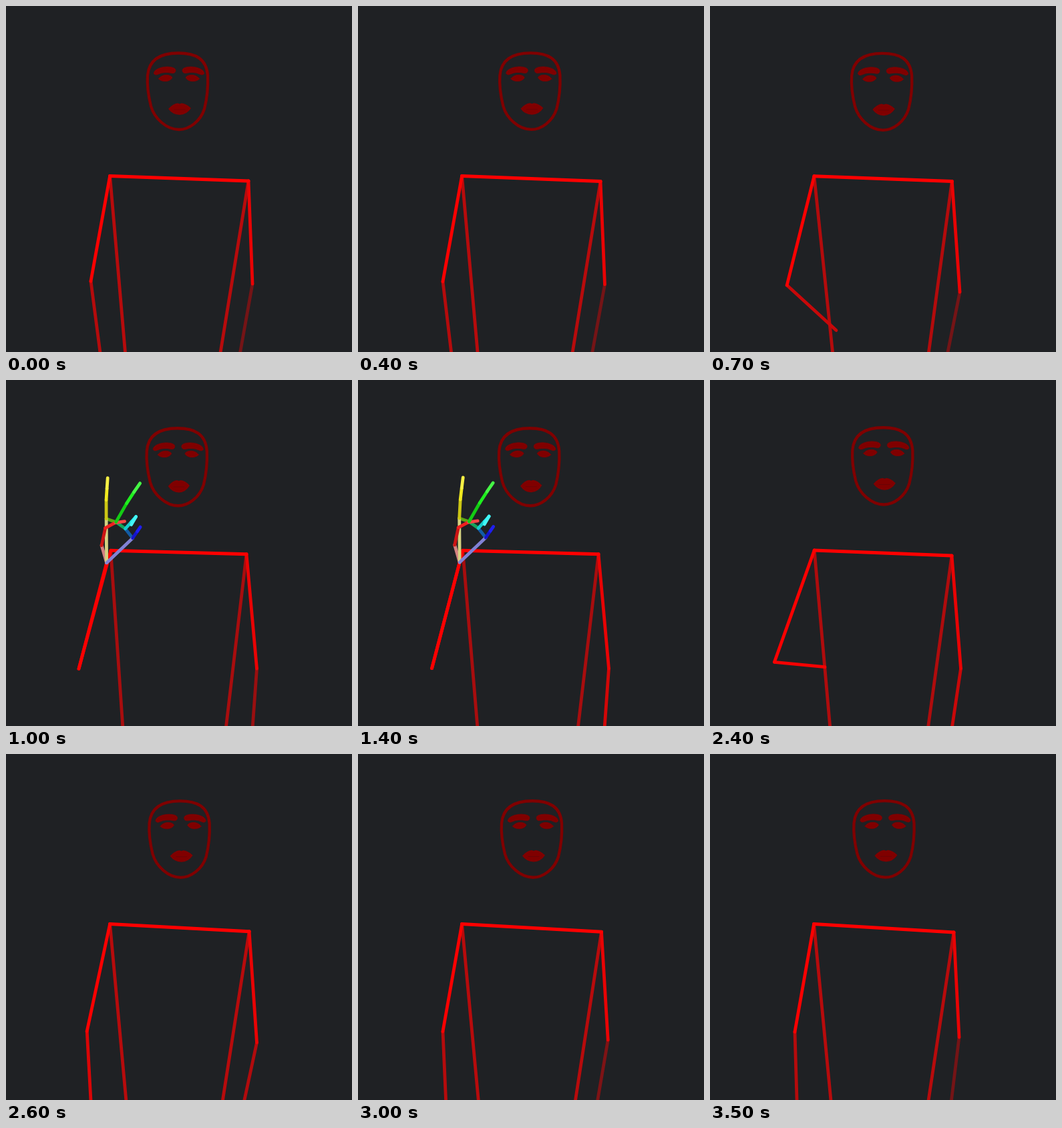
These frames come from a looping animation (518x518 px, 3600 ms). An HTML page with a canvas:

```html
<!DOCTYPE html>
<html lang="en">
<head>
<meta charset="utf-8">
<title>Pose tracking</title>
<style>
html, body { margin: 0; width: 100%; height: 100%; overflow: hidden; background: #1f2124; }
canvas { display: block; width: 518px; height: 518px; }
</style>
</head>
<body>
<canvas id="stage" width="518" height="518"></canvas>
<script>
const ctx = document.getElementById('stage').getContext('2d');
const LOOP = 3600, STEP = 100;
const BG = [31, 33, 36];

const mix = (a, b, k) => a + (b - a) * k;
const bump = (t, centre, width) => Math.exp(-(((t - centre) / width) ** 2));

function ramp(t, from, to) {
  const k = Math.min(1, Math.max(0, (t - from) / (to - from)));
  return k * k * (3 - 2 * k);
}

const pulse = (t, up, top, leave, down) => ramp(t, up, top) - ramp(t, leave, down);

function red(level) {
  return `rgb(${BG.map((v, i) => Math.round(mix(v, i ? 0 : 255, level)))})`;
}

function line(a, b, color, width = 4.8) {
  ctx.strokeStyle = color;
  ctx.lineWidth = width;
  ctx.beginPath();
  ctx.moveTo(a[0], a[1]);
  ctx.lineTo(b[0], b[1]);
  ctx.stroke();
}

// The body drifts slowly while the left forearm swings up about its elbow and back.
function poseAt(t) {
  const drift = t / (LOOP - STEP);
  const late = drift * drift;
  const lift = pulse(t, 550, 1000, 2200, 2600);
  const follow = pulse(t, 550, 1000, 2200, 3000);
  const stance = pulse(t, 500, 800, 2200, 2600);
  const hang = pulse(t, 500, 800, 2600, 3500);
  const swing = Math.sin(Math.PI * lift);

  const elbowL = [
    mix(127, 105 + 14 * drift, follow) - (5 + 22 * drift) * swing,
    mix(412 + 4 * drift, 434 - 6 * drift, lift)
  ];
  const angle = mix(.13 - .1 * drift, 2.885, lift);
  const reach = 164 - 88 * swing;

  return {
    drift, lift, elbowL,
    wristL: [elbowL[0] + reach * Math.sin(angle), elbowL[1] + reach * Math.cos(angle)],
    shoulderL: [mix(155.6, 156.8, lift), mix(254.5, 255.3, lift)],
    shoulderR: [mix(363 + 2 * late, 360, lift), mix(262 + 5 * drift, 260.7, lift)],
    elbowR: [mix(369 + 4 * drift, 375.5, hang), mix(416 + 8 * drift, 432, hang)],
    wristR: [mix(350 + 11 * late, 369, lift), 522],
    hipL: [178.5 + 2.5 * late + 5.5 * bump(t, 700, 200) - 4.5 * bump(t, 1000, 200), 519],
    hipR: [mix(321 + 6 * late, 329.5, stance), 519],
    glowL: mix(.67, 1, follow),
    glowR: mix(.38, .8, pulse(t, 700, 1400, 2200, 3200))
  };
}

const outline = new Path2D('M258 70.5C284 70.5 300 79 302 104C303 126 300 142 297 154C291 173 274 185 259 185C240 185 222 168 217 150C212 130 211 118 212 104C214 80 232 70.5 258 70.5Z');
const brow = new Path2D('M-37.5 101C-38 95 -27 91 -17 91Q-5 91.5 -5 96.5Q-5.5 101 -10 100.5Q-23 98 -31 102Q-36 104.5 -37.5 101Z');
const eye = new Path2D('M-30.5 109C-26 102 -14 101.5 -10 107C-13 114 -26 114.5 -30.5 109Z');
const lips = new Path2D('M-17 0Q-10 -8 -3 -8.5L0 -7.5L3 -8.5Q10 -8 17 -1Q11 8.5 0 9Q-11 8.5 -17 0Z');

function drawFace({ drift, lift }) {
  const dx = 3.5 * drift - 2.2 * lift;
  const dy = 3.2 * lift - drift;
  const dark = '#640608';
  ctx.strokeStyle = ctx.fillStyle = '#800000';

  ctx.save();
  ctx.translate(dx, dy * .3);
  ctx.scale(1, 1 + .013 * lift);
  ctx.lineWidth = 4.3;
  ctx.stroke(outline);
  ctx.restore();

  ctx.lineWidth = .8;
  for (const side of [1, -1]) {
    ctx.save();
    ctx.translate(259 + dx, dy);
    ctx.scale(side, 1);
    for (const part of [brow, eye]) {
      ctx.fill(part);
      ctx.stroke(part);
    }
    ctx.restore();
  }

  ctx.save();
  ctx.translate(260 + dx, 154 + dy * 1.7);
  ctx.scale(1 - lift * .05, 1 + lift * .06);
  ctx.fill(lips);
  ctx.restore();
  line([252 + dx, 155 + dy * 1.7], [268 + dx, 155 + dy * 1.7], dark, .8);
}

function drawBody(p) {
  const torso = red(.68 - .07 * p.lift);
  line(p.shoulderL, p.hipL, torso);
  line(p.shoulderR, p.hipR, torso);
  line(p.elbowR, p.wristR, red(p.glowR));
  line(p.elbowL, p.wristL, red(p.glowL));
  line(p.shoulderL, p.elbowL, red(.98));
  line(p.shoulderR, p.elbowR, red(.9));
  line(p.shoulderL, p.shoulderR, red(1), 5);
}

// Finger joints from knuckle to tip, relative to the wrist.
const fingers = [
  { hue: 0, palm: true, joints: [[-7.5, -26], [-2, -52], [13, -60], [27, -62]] },
  { hue: 58, palm: true, joints: [[-.5, -66], [1, -94], [3, -111], [5, -127]], sway: true },
  { hue: 120, joints: [[14, -61], [30, -89], [41, -106], [50, -119]] },
  { hue: 180, joints: [[28, -51], [37, -61], [44, -69], [37, -57]] },
  { hue: 240, palm: true, joints: [[39, -37], [46, -47], [50.5, -53.5]] }
];

function drawHand({ drift, lift, wristL: [x, y] }) {
  if (lift < .8) return;
  const lean = 30 * drift - 12;
  const hand = fingers.map(f => f.joints.map(([jx, jy]) =>
    [x + jx + (f.sway ? lean * (-66 - jy) / 61 : 0), y + jy]));

  for (let i = 1; i < 4; i++) {
    const hue = (fingers[i].hue + fingers[i + 1].hue) / 2;
    line(hand[i][0], hand[i + 1][0], `hsl(${hue} 80% 36%)`);
  }
  fingers.forEach(({ hue, palm }, i) => {
    if (palm) line([x, y], hand[i][0], `hsl(${hue} 50% 67%)`);
  });
  fingers.forEach(({ hue }, i) => {
    for (let j = 1; j < hand[i].length; j++) {
      line(hand[i][j - 1], hand[i][j], `hsl(${hue} ${77 + 5 * j}% ${35 + 9 * j}%)`);
    }
  });
}

function draw(t) {
  const pose = poseAt(t);
  ctx.fillStyle = `rgb(${BG})`;
  ctx.fillRect(0, 0, 518, 518);
  ctx.lineCap = ctx.lineJoin = 'round';
  drawFace(pose);
  drawBody(pose);
  drawHand(pose);
}

const start = performance.now();
function tick() {
  const t = (performance.now() - start) % LOOP;
  draw(Math.floor(t / STEP) * STEP);
  requestAnimationFrame(tick);
}
tick();
</script>
</body>
</html>
```
